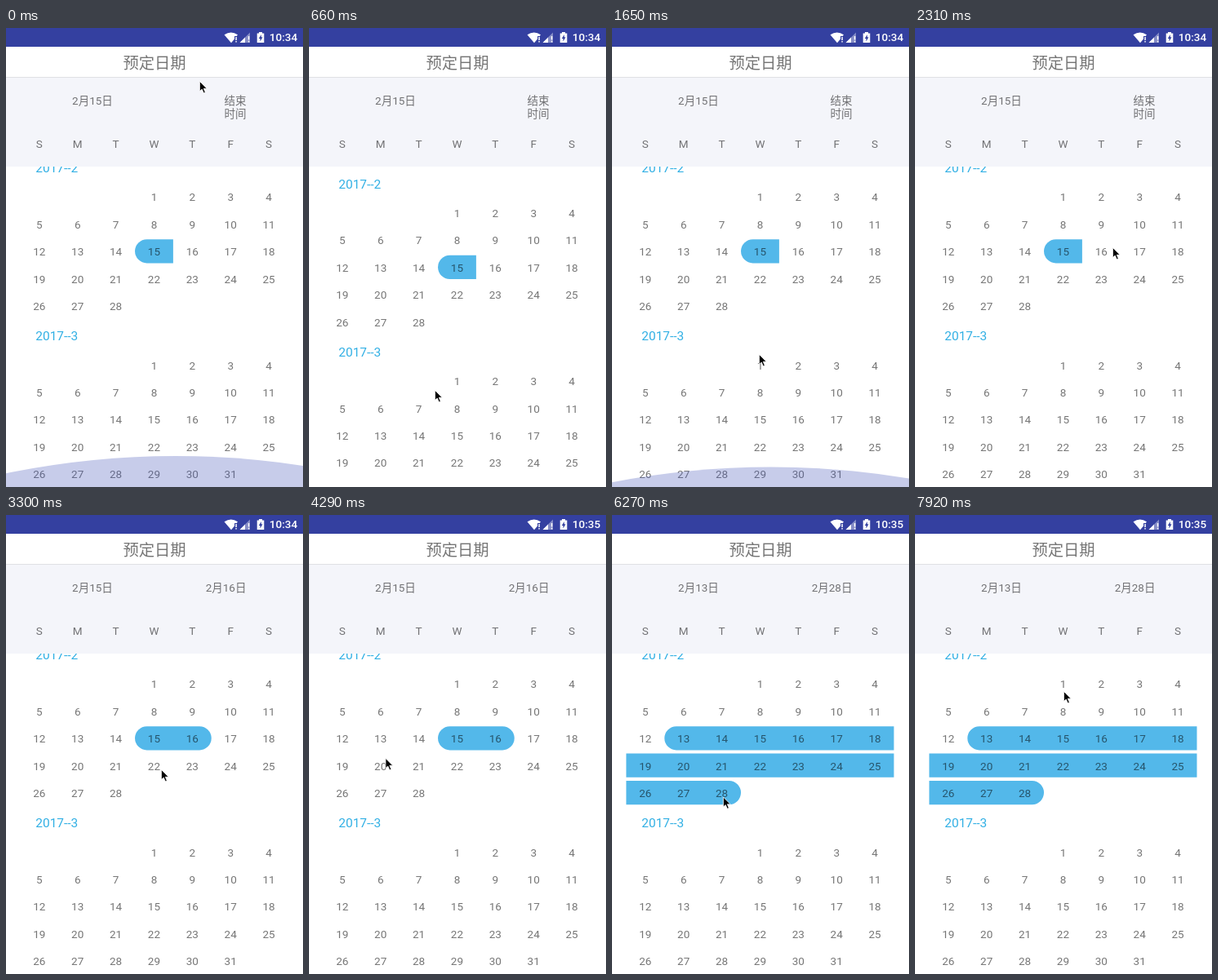
Animation, 364 px wide and 563 px high, one loop 8000 ms. Source, as an HTML page:

```html
<!DOCTYPE html>
<html lang="zh-CN">
<head>
<meta charset="utf-8">
<style>
html, body { margin: 0; width: 100%; height: 100%; overflow: hidden; background: #fff; }
svg { display: block; width: 364px; height: 563px; }
text { font: 13.5px Roboto, "Noto Sans CJK SC", "Noto Sans CJK", sans-serif; fill: rgba(0, 0, 0, .54); }
.mid { text-anchor: middle; }
.end { text-anchor: end; }
.title { font-size: 19.3px; }
.month { font-size: 15.45px; fill: #30afe4; }
.clock { font-weight: 500; fill: #fff; }
.range { fill: #53b8ea; }
.glow { fill: #3f51b5; fill-opacity: .29; }
</style>
</head>
<body>
<svg viewBox="0 0 364 563">
  <defs><clipPath id="view"><rect y="170" width="364" height="393"/></clipPath></defs>
  <rect width="364" height="563" fill="#fff"/>
  <g clip-path="url(#view)">
    <g id="list"><path id="range" class="range"/></g>
    <circle id="glow" class="glow" r="1030"/>
  </g>

  <rect y="60" width="364" height="110" fill="#f4f5fa"/>
  <rect y="60" width="364" height="1" fill="#e0e1e4"/>
  <text class="mid title" x="182" y="50">预定日期</text>
  <text id="from" class="mid" x="106" y="94.2"></text>
  <text id="to" class="end" x="294.4" y="94.2"></text>
  <text id="to2" class="end" x="294.4" y="110"></text>
  <g id="week"></g>

  <rect width="364" height="23" fill="#3440a0"/>
  <g fill="#fff">
    <path d="M267.5 8.2Q275.8 2.8 284 8.2L282.6 10H280V13.5L276 18.2Z"/>
    <path d="M281.3 11h1.5v4h-1.5zm0 5h1.5v1.6h-1.5z"/>
    <path d="M299 5.5V18H286.5Z" opacity=".4"/>
    <path d="M293 11.5V18H286.5ZM296.8 10h1.5v4.6h-1.5zm0 5.8h1.5v1.7h-1.5z"/>
    <path fill-rule="evenodd" d="M310 5h4v1.4h2.3V18h-8.6V6.4H310zM312.8 8l-3 5h1.7v3.5l3-5.2h-1.7z"/>
  </g>
  <text id="clock" class="clock" x="322.8" y="16"></text>
  <path id="cursor" fill="#000" stroke="#fff" stroke-width=".8"
        d="M.4.4V12.6L3.2 10.1 5.3 14.8 7.3 13.9 5.3 9.3H9.2Z"/>
</svg>
<script>
const $ = id => document.getElementById(id);
const NS = 'http://www.w3.org/2000/svg';
const STEP = 330, LOOP = 8000;
const LEFT = 17.4, COL = 46.87, ROW = 33.4, FIRST = 3;
const FEB = 208, MAR = 414.2;

function label(parent, str, x, y, cls) {
  const el = document.createElementNS(NS, 'text');
  el.setAttribute('x', x);
  el.setAttribute('y', y);
  el.setAttribute('class', cls);
  el.textContent = str;
  parent.append(el);
}

const colX = c => LEFT + COL * (c + .5);

function month(name, top, days) {
  label($('list'), name, 36.3, top - 31, 'month');
  for (let d = 1; d <= days; d++) {
    const i = d - 1 + FIRST;
    label($('list'), d, colX(i % 7), top + ROW * Math.floor(i / 7) + 4.4, 'mid');
  }
}

month('2017--2', FEB, 28);
month('2017--3', MAR, 31);
[...'SMTWTFS'].forEach((s, i) => label($('week'), s, colX(i), 147.2, 'mid'));

// One bar per week row, rounded at the first and last selected day
function rangePath(a, b) {
  const first = a - 1 + FIRST, last = (b || a) - 1 + FIRST;
  const r = 14.6;
  let d = '';
  for (let row = Math.floor(first / 7); row <= Math.floor(last / 7); row++) {
    const from = Math.max(first, row * 7), to = Math.min(last, row * 7 + 6);
    const x1 = LEFT + COL * (from - row * 7), x2 = LEFT + COL * (to - row * 7 + 1);
    const y1 = FEB + ROW * row - r - 1, y2 = y1 + 2 * r;
    const rl = from === first ? r : 0, rr = b && to === last ? r : 0;
    d += `M${x1 + rl} ${y1}H${x2 - rr}A${rr} ${rr} 0 0 1 ${x2 - rr} ${y2}` +
         `H${x1 + rl}A${rl} ${rl} 0 0 1 ${x1 + rl} ${y1}Z`;
  }
  return d;
}

// Pointer position in each step
const pointer = [
  [237, 65], [185, 330], [154, 444], [153, 447], [132, 522], [180, 400],
  [226, 262], [242, 269], [238, 278], [236, 303], [190, 312], [150, 312],
  [150, 312], [93.5, 298], [84, 285], [82, 276], [84, 279], [136, 345.5],
  [136, 345.5], [136, 345.5], [303, 240], [304, 224], [240, 222],
  [182, 220], [182, 216]
];

// Overscroll: step -> centre x, height, at top
const glows = { 0: [208, 38], 3: [165, 25, true], 5: [195, 24.5], 6: [205, 38] };

const selection = s => s < 9 ? [15] : s < 16 ? [15, 16] : s < 19 ? [13] : [13, 28];

let shown = -1;

function draw(s) {
  const [x, y] = pointer[s];
  $('cursor').setAttribute('transform', `translate(${x} ${y})`);
  $('list').setAttribute('transform', `translate(0 ${s >= 2 && s <= 4 ? 19.6 : 0})`);

  const [gx, h, top] = glows[s] || [182, 0];
  $('glow').setAttribute('visibility', h ? 'visible' : 'hidden');
  $('glow').setAttribute('cx', gx);
  $('glow').setAttribute('cy', top ? 170 + h - 1030 : 563 - h + 1030);

  const [a, b] = selection(s);
  $('range').setAttribute('d', rangePath(a, b));
  $('from').textContent = `2月${a}日`;
  $('to').textContent = b ? `2月${b}日` : '结束';
  $('to2').textContent = b ? '' : '时间';
  $('clock').textContent = s < 12 ? '10:34' : '10:35';
}

const start = performance.now();
function tick() {
  const s = Math.floor((performance.now() - start) % LOOP / STEP);
  if (s !== shown) draw(shown = s);
  requestAnimationFrame(tick);
}
tick();
</script>
</body>
</html>
```
